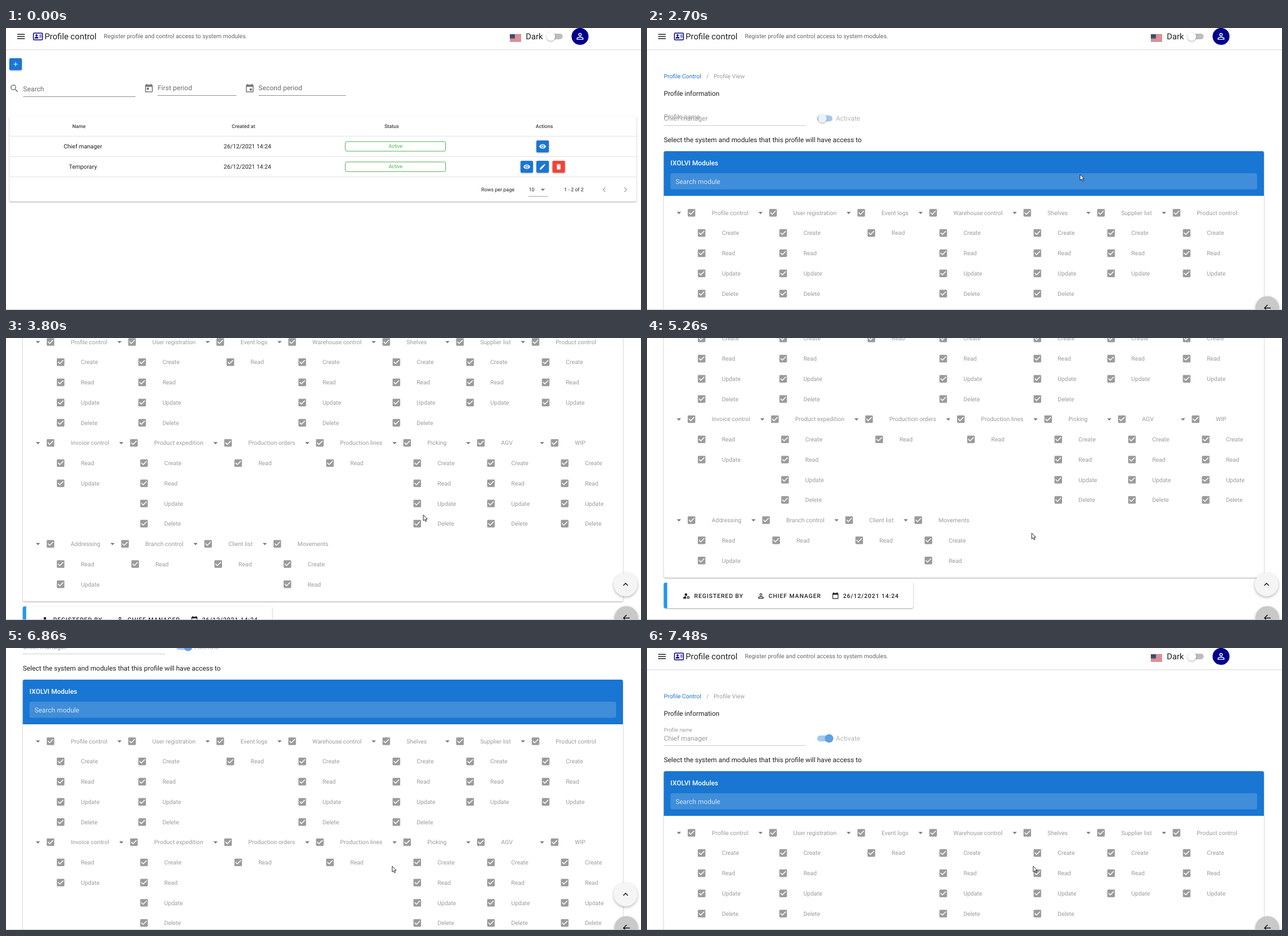
An HTML page that plays this animation: 1123x499 px, repeating every 8000 ms.

```html
<!DOCTYPE html>
<html lang="en">
<head>
<meta charset="utf-8">
<title>Profile control</title>
<style>
html, body { margin: 0; width: 100%; height: 100%; overflow: hidden; background: #fff; }
svg { display: block; width: 1123px; height: 499px; font-family: Roboto, sans-serif; text-rendering: geometricPrecision; }
.card { fill: #fff; filter: drop-shadow(0 1px 1.3px rgba(0,0,0,.36)); }
.raised { filter: drop-shadow(0 1px 1.5px rgba(0,0,0,.35)); }
.float { filter: drop-shadow(0 2px 2.5px rgba(0,0,0,.28)); }
</style>
</head>
<body>
<svg id="stage" viewBox="0 0 1123 499"></svg>
<script>
const BLUE = '#1976d2', NAVY = '#00008b', INK = '#212121', GREY = '#757575', DIM = '#9b9b9b';
const BODY = 10.42, SMALL = 8.93, LARGE = 11.9, TITLE = 14.75;

const calendar = mark => 'M19 3h-1V1h-2v2H8V1H6v2H5a2 2 0 0 0-2 2v14a2 2 0 0 0 2 2h14a2 2 0 0 0 2-2V5a2 2 0 0 0-2-2zm0 16H5V8h14z' + mark;
const ICONS = {
  menu: 'M3 18h18v-2H3zM3 13h18v-2H3zM3 6v2h18V6z',
  add: 'M19 13h-6v6h-2v-6H5v-2h6V5h2v6h6z',
  search: 'M15.5 14h-.8l-.3-.3a6.5 6.5 0 1 0-.7.7l.3.3v.8l5 5 1.5-1.5zm-6 0a4.5 4.5 0 1 1 0-9 4.5 4.5 0 0 1 0 9z',
  today: calendar('M7 10h5v5H7z'),
  event: calendar('M12 12h5v5h-5z'),
  date: calendar(''),
  eye: 'M12 4.5C7 4.5 2.7 7.6 1 12c1.7 4.4 6 7.5 11 7.5s9.3-3.1 11-7.5c-1.7-4.4-6-7.5-11-7.5zM12 17a5 5 0 1 1 0-10 5 5 0 0 1 0 10zm0-8a3 3 0 1 0 0 6 3 3 0 0 0 0-6z',
  edit: 'M3 17.2V21h3.8L17.8 9.9l-3.7-3.7zM20.7 7a1 1 0 0 0 0-1.4l-2.3-2.3a1 1 0 0 0-1.4 0l-1.9 1.8 3.8 3.8z',
  trash: 'M6 19a2 2 0 0 0 2 2h8a2 2 0 0 0 2-2V7H6zM19 4h-3.5l-1-1h-5l-1 1H5v2h14z',
  person: 'M12 5.9a2.1 2.1 0 1 1 0 4.2 2.1 2.1 0 0 1 0-4.2m0 9c3 0 6.1 1.5 6.1 2.1v1.1H5.9V17c0-.6 3.1-2.1 6.1-2.1M12 4a4 4 0 1 0 0 8 4 4 0 0 0 0-8zm0 9c-2.7 0-8 1.3-8 4v3h16v-3c0-2.7-5.3-4-8-4z',
  manage: 'M10 4a4 4 0 1 0 0 8 4 4 0 0 0 0-8zM10.5 13C7 13 2 14.5 2 17.5V20h9.5a7 7 0 0 1-1-7zM17 12.5a4 4 0 1 0 0 8 4 4 0 0 0 0-8zm0 2.2a1.8 1.8 0 1 1 0 3.6 1.8 1.8 0 0 1 0-3.6z',
  back: 'M20 11H7.8l5.6-5.6L12 4l-8 8 8 8 1.4-1.4L7.8 13H20z',
  up: 'M7.4 15.4 12 10.8l4.6 4.6L18 14l-6-6-6 6z',
  left: 'M15.4 7.4 14 6l-6 6 6 6 1.4-1.4-4.6-4.6z',
  right: 'M10 6 8.6 7.4l4.6 4.6-4.6 4.6L10 18l6-6z',
  drop: 'M7 10l5 5 5-5z',
  check: 'M19 3H5a2 2 0 0 0-2 2v14a2 2 0 0 0 2 2h14a2 2 0 0 0 2-2V5a2 2 0 0 0-2-2zm-9 14l-5-5 1.4-1.4 3.6 3.6 7.6-7.6L19 8z'
};

// Markup helpers; text and icons are placed by their vertical centre.
const text = (s, x, y, size = BODY, fill = INK, more = '') =>
  `<text x="${x}" y="${y + size * .36}" font-size="${size}" fill="${fill}" ${more}>${s}</text>`;
const mid = 'text-anchor="middle" ', bold = 'font-weight="500" ';
const icon = (name, x, y, size = 18, fill = GREY) =>
  `<path d="${ICONS[name]}" fill="${fill}" fill-rule="evenodd" transform="translate(${x - size / 2} ${y - size / 2}) scale(${size / 24})"/>`;
const rect = (x, y, w, h, fill, r = 0, more = '') =>
  `<rect x="${x}" y="${y}" width="${w}" height="${h}" rx="${r}" fill="${fill}" ${more}/>`;
const circle = (x, y, r, fill, more = '') => `<circle cx="${x}" cy="${y}" r="${r}" fill="${fill}" ${more}/>`;
const rule = (x, y, w, fill = '#8f8f8f') => rect(x, y, w, 1, fill);
const button = (name, x, y, fill = BLUE, id = '') =>
  rect(x - 11, y - 10.5, 22, 21, fill, 2, `class="raised" ${id}`) + icon(name, x, y, 13, '#fff');
const each = (list, make) => list.map(make).join('');

function flag() {
  const stripes = each([...Array(7).keys()], i => rect(891, 11 + i * 2, 20, 1.1, '#c8454f'));
  return rect(891, 11, 20, 14, '#eee') + stripes + rect(891, 11, 9, 7.5, '#3c4a78');
}

function header() {
  return icon('menu', 26.5, 15, 18, INK) +
    rect(48.5, 9, 16, 12, 'none', 1.5, `stroke="${NAVY}" stroke-width="1.5"`) +
    circle(54, 13, 1.9, NAVY) + `<path d="M50.5 18.5a3.5 3 0 0 1 7 0z" fill="${NAVY}"/>` +
    rect(59, 12, 4, 1.3, NAVY) + rect(59, 15, 4, 1.3, NAVY) +
    text('Profile control', 68.3, 15, TITLE) +
    text('Register profile and control access to system modules.', 173, 14.5, BODY, '#666') +
    flag() + text('Dark', 919.3, 15, TITLE) +
    rect(960, 10, 24.5, 10, '#bdbdbd', 5) + circle(963.5, 15, 7.7, '#fff', 'class="raised"') +
    circle(1015.2, 14.8, 15, NAVY) + icon('person', 1015.2, 14.8, 18, '#fff') +
    rule(0, 38, 1123, '#d8d8d8');
}

const field = (name, label, x, y, w) =>
  icon(name, x - 15.5, 107) + text(label, x, y - 13, LARGE, '#6a6a6a', 'letter-spacing=".1"') + rule(x, y, w);

function tableRow(name, y, id) {
  return rect(6, y - 17.5, 1108, 35, '#000', 0, `id="${id}" opacity="0"`) +
    text(name, 136, y, BODY, INK, mid) + text('26/12/2021 14:24', 427, y, BODY, INK, mid) +
    rect(600, y - 8.5, 177.5, 17, '#fff', 3, 'stroke="#4caf50"') +
    text('Active', 689, y - .3, SMALL, '#4caf50', mid) + button('eye', id === 'row1' ? 949 : 921, y);
}

function listPage() {
  const heads = { Name: 129, 'Created at': 420, Status: 682, Actions: 952 };
  return button('add', 17, 64) + field('search', 'Search', 30.3, 121, 198.7) +
    field('today', 'First period', 268.2, 119, 139.3) + field('event', 'Second period', 446.6, 119, 154.4) +
    rect(6, 156, 1109, 151, '#fff', 3, 'class="card"') +
    each(Object.entries(heads), ([s, x]) => text(s, x, 174, SMALL, '#444', mid + bold)) +
    tableRow('Chief manager', 209.5, 'row1') + tableRow('Temporary', 245.5, 'row2') +
    each([191, 227, 263], y => rule(6, y, 1109, '#e2e2e2')) +
    button('edit', 949, 245.5) + button('trash', 977.5, 245.5, '#f44336') +
    text('Rows per page', 840.5, 286, SMALL) + text('10', 924.5, 286, SMALL) +
    icon('drop', 949.5, 286) + rule(924, 297.5, 34, '#999') + text('1 - 2 of 2', 987, 286, SMALL) +
    icon('left', 1058, 286, 18, '#aaa') + icon('right', 1095.5, 286, 18, '#aaa');
}

const TREE = [
  'Profile control:CRUD,User registration:CRUD,Event logs:R,Warehouse control:CRUD,Shelves:CRUD,Supplier list:CRU,Product control:CRU',
  'Invoice control:RU,Product expedition:CRUD,Production orders:R,Production lines:R,Picking:CRUD,AGV:CRUD,WIP:CRUD',
  'Addressing:RU,Branch control:R,Client list:R,Movements:CR'
];
const ACTIONS = { C: 'Create', R: 'Read', U: 'Update', D: 'Delete' };

// Columns flow from left to right, each as wide as its longest label.
function tree() {
  const pen = document.createElement('canvas').getContext('2d');
  pen.font = `100px Roboto, sans-serif`;
  const width = s => pen.measureText(s).width * BODY / 100;
  const pitch = 35.73, indent = 17.9, gap = 79.4;
  const node = (s, x, y) => icon('check', x - 35.8, y, 17.9, DIM) + text(s, x, y, BODY, DIM);
  return each(TREE, (row, r) => {
    const y = 327 + r * 5 * pitch;
    let next = 114.5;
    return each(row.split(','), column => {
      const [name, keys] = column.split(':'), x = next, acts = [...keys].map(k => ACTIONS[k]);
      next += gap + Math.max(width(name), ...acts.map(a => indent + width(a)));
      return icon('drop', x - 58, y) + node(name, x, y) +
        each(acts, (a, i) => node(a, x + indent, y + (i + 1) * pitch));
    });
  });
}

function viewPage() {
  const left = 29.7, caps = bold + 'letter-spacing=".9"';
  const stamp = (name, s, x) => icon(name, x - 13.5, 818.5, 14, INK) + text(s, x, 818.7, BODY, INK, caps);
  return text('Profile Control', left, 85, BODY, BLUE) + text('/', 105, 85, BODY, DIM) + text('Profile View', 118, 85, BODY, DIM) +
    text('Profile information', left, 115.5, LARGE) +
    `<g id="label">${text('Profile name', 0, 0, LARGE, DIM)}</g>` +
    text('Chief manager', left, 160, LARGE, DIM) +
    `<path d="M${left} 172.5H281" stroke="#999" stroke-dasharray="1 1"/>` +
    rect(301, 154.7, 27, 10.6, '#a3c8ed', 5.3) + circle(0, 160, 7.6, '#fff', 'id="knob" class="raised"') +
    text('Activate', 334, 160, LARGE, '#b5b5b5') +
    text('Select the system and modules that this profile will have access to', left, 197.5, LARGE) +
    rect(left, 218, 1061.3, 568, '#fff', 3, 'class="card"') +
    `<path d="M${left} 297V221q0-3 3-3H1088q3 0 3 3v76z" fill="${BLUE}"/>` +
    text('IXOLVI Modules', 41.6, 239, LARGE, '#fff', bold) +
    rect(41.5, 257, 1037.5, 28.5, '#408dd9', 3) + text('Search module', 50.5, 271.5, LARGE, '#d3e5f7') +
    tree() +
    rect(left, 795, 441, 45, '#fff', 3, 'class="card"') +
    `<path d="M${left + 6} 795h-3q-3 0-3 3v39q0 3 3 3h3z" fill="#2196f3"/>` +
    stamp('manage', 'REGISTERED BY', 83.5) + stamp('person', 'CHIEF MANAGER', 215) + stamp('date', '26/12/2021 14:24', 346.7);
}

const floating = (id, name, x, y, fill) =>
  `<g id="${id}">${circle(x, y, 21, fill, 'class="float"') + icon(name, x, y, 18, '#111')}</g>`;

const $ = id => document.getElementById(id);
$('stage').innerHTML =
  `<g id="page">${header()}<g id="list">${listPage()}</g><g id="detail">${viewPage()}</g></g>` +
  floating('top', 'up', 1095.7, 436, '#f5f5f5') + floating('back', 'back', 1097, 495.5, '#c9c9c9') +
  rect(0, 498, 1123, 1, '#c4c4c8') +
  '<path id="cursor" d="M0 0V10.3l2.4-2.1 1.6 3.6 1.7-.8-1.6-3.4h3.1z" fill="#fff" stroke="#111" stroke-width=".9"/>';

const set = (id, name, value) => $(id).setAttribute(name, value);
const mix = (a, b, f) => a + (b - a) * f;
const ramp = (t, from, to) => Math.min(1, Math.max(0, (t - from) / (to - from)));

// Pointer moves: start, end, where it arrives.
const GLIDES = [
  [260, 540, 1028, 270], [740, 1560, 949, 212], [1560, 1830, 946, 207],
  [2440, 2700, 766, 259], [2700, 3050, 738, 313],
  [5190, 5260, 681, 345], [5260, 5400, 600, 372], [5400, 5680, 640, 271], [5680, 6090, 683, 386]
];
const pointer = t => GLIDES.reduce(([x, y], [from, to, px, py]) => {
  const f = ramp(t, from, to);
  return [mix(x, px, f), mix(y, py, f)];
}, [1098, 555]);

const scroll = t => Math.round(362 * ramp(t, 3280, 3870) - 312 * ramp(t, 6468, 7080) - 50 * ramp(t, 7140, 7480));

function draw(t) {
  const [x, y] = pointer(t);
  const shown = ramp(t, 2440, 2650);
  const f = ramp(t, 2660, 3050) ** .9;
  const hover = (from, to) => t >= 810 && y >= from && y < to ? .03 : 0;

  set('cursor', 'transform', `translate(${x} ${y})`);
  set('cursor', 'opacity', t < 330 ? 0 : 1);
  set('page', 'transform', `translate(0 ${-scroll(t)})`);
  set('list', 'opacity', 1 - ramp(t, 1900, 2320));
  set('detail', 'opacity', shown);
  set('back', 'opacity', shown);
  set('top', 'opacity', ramp(t, 3240, 3380) - ramp(t, 7210, 7420));
  set('row1', 'opacity', hover(192, 228));
  set('row2', 'opacity', hover(228, 264));
  set('label', 'transform', `translate(29.7 ${mix(159, 144.7, f)}) scale(${mix(1, .75, f)})`);
  set('knob', 'cx', mix(308.5, 322, f));
  set('knob', 'fill', `rgb(${mix(255, 94, f)},${mix(255, 161, f)},${mix(255, 225, f)})`);
  $('knob').style.filter = f === 1 ? 'none' : '';
}

function frame(now) {
  draw(now % 8000);
  requestAnimationFrame(frame);
}
draw(0);
requestAnimationFrame(frame);
</script>
</body>
</html>
```
